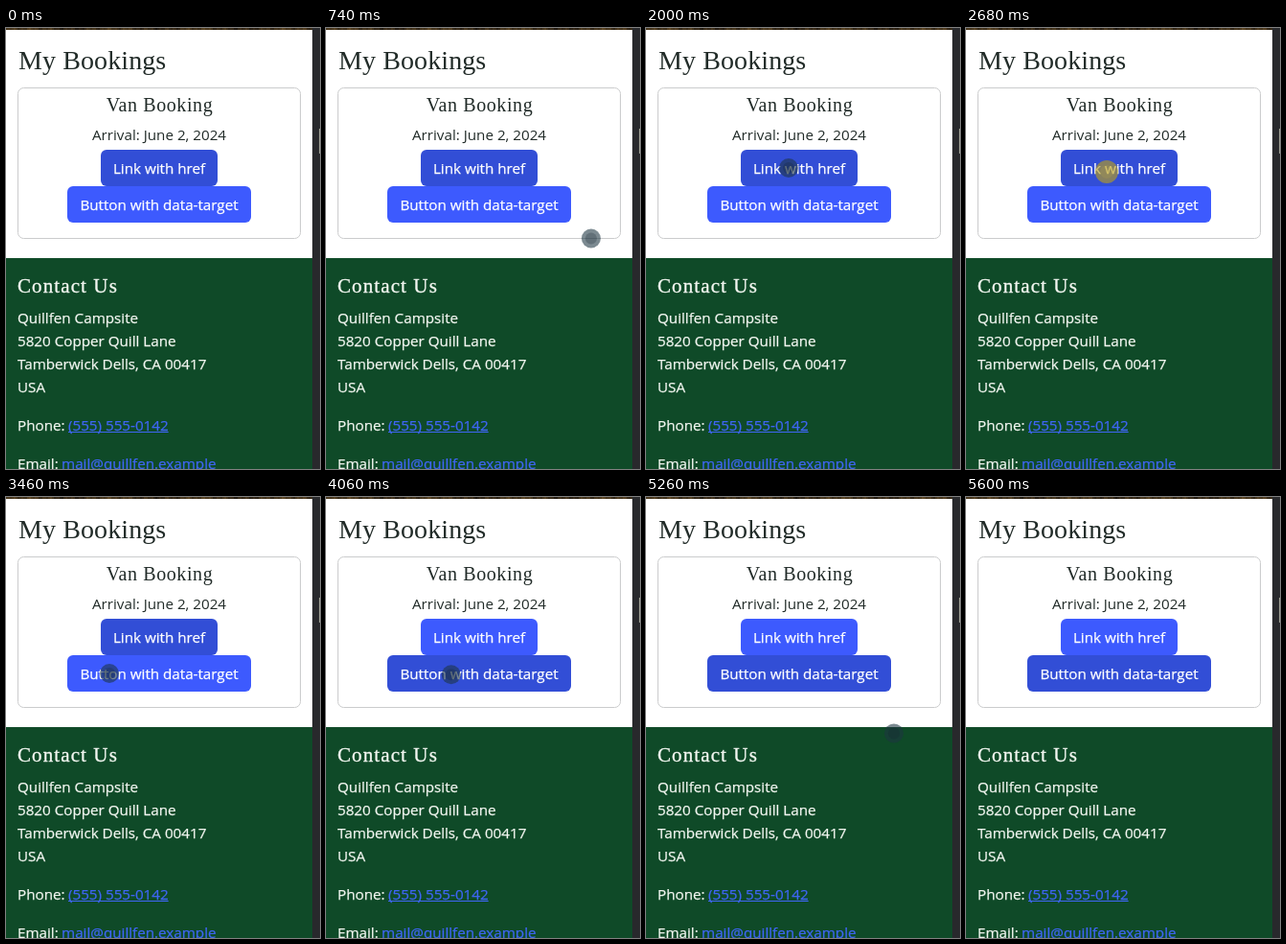
Animation, 328 px wide and 460 px high, one loop 6600 ms. Source, as an HTML page with a canvas:

```html
<!DOCTYPE html>
<html lang="en">
<head>
<meta charset="utf-8">
<title>My Bookings</title>
<style>
html, body { margin: 0; width: 100%; height: 100%; overflow: hidden; background: #fff; }
canvas { display: block; width: 328px; height: 460px; }
</style>
</head>
<body>
<canvas id="stage"></canvas>
<script>
const W = 328, H = 460, LOOP = 6600;
const SANS = '15.2px "Open Sans", "Noto Sans", sans-serif';
const SERIF = '"Liberation Serif", "Noto Serif", serif';
const BLUE = [61, 90, 254], HOVER = [50, 78, 214];
const INK = '#212b28', PALE = '#f3f7f1', LINK = '#3f66f5';

const canvas = document.getElementById('stage');
const ctx = canvas.getContext('2d');
const dpr = window.devicePixelRatio || 1;
canvas.width = W * dpr;
canvas.height = H * dpr;
ctx.scale(dpr, dpr);

// Pointer stops: time, x, y
const path = [
  [380, 340, 262], [1260, 168, 146], [1440, 168, 146], [2000, 149, 146],
  [2680, 147, 150], [2800, 147, 150], [3460, 108, 184], [3560, 107, 184],
  [3740, 107, 184], [4300, 146, 186], [4660, 146, 186], [4840, 144, 186],
  [5600, 342, 290]
];
const presses = [[1260, 1440], [2680, 2800], [3560, 3740], [4300, 4660]];
const SWITCH = 3740, FADE = 150;

const clamp = v => Math.max(0, Math.min(1, v));
const ease = v => v * v * (3 - 2 * v);
const mix = (a, b, k) => `rgb(${a.map((v, i) => Math.round(v + (b[i] - v) * k))})`;

function rect(x, y, w, h, color) {
  ctx.fillStyle = color;
  ctx.fillRect(x, y, w, h);
}

function disc(x, y, r, color) {
  ctx.fillStyle = color;
  ctx.beginPath();
  ctx.arc(x, y, r, 0, Math.PI * 2);
  ctx.fill();
}

// A thin outline adds a little weight to the strokes.
function text(str, x, y, color, { font = SANS, align = 'left', weight = 0.25, spacing = 0 } = {}) {
  ctx.font = font;
  ctx.textAlign = align;
  ctx.letterSpacing = spacing + 'px';
  ctx.fillStyle = ctx.strokeStyle = color;
  ctx.lineWidth = weight;
  ctx.fillText(str, x, y);
  if (weight) ctx.strokeText(str, x, y);
  return ctx.measureText(str).width;
}

function heading(str, x, y, size, color, style) {
  text(str, x, y, color, { font: `${size}px ${SERIF}`, weight: 0, ...style });
}

function button(label, x, y, w, hover) {
  ctx.fillStyle = mix(BLUE, HOVER, hover);
  ctx.beginPath();
  ctx.roundRect(x, y, w, 38, 6);
  ctx.fill();
  text(label, x + w / 2, y + 25, '#fff', { align: 'center' });
}

function link(label, x, y) {
  const w = text(label, x, y, LINK);
  rect(x, y + 1, w, 1, LINK);
}

// Sliver of a dark woodland photo
function drawPhoto() {
  for (let x = 0; x < 320; x += 2) {
    const k = (Math.sin(x * 0.31) + Math.sin(x * 0.83 + 1) + Math.sin(x * 0.07)) / 6 + 0.5;
    rect(x, 0, 2, 2, mix([26, 20, 13], [98, 74, 38], k));
  }
}

function drawPage(t) {
  rect(0, 0, W, H, '#fff');
  drawPhoto();

  heading('My Bookings', 13, 43, 28, INK, { spacing: 0.1 });
  ctx.strokeStyle = '#cbcccd';
  ctx.lineWidth = 1;
  ctx.beginPath();
  ctx.roundRect(12.5, 62.5, 295, 157, 6);
  ctx.stroke();
  heading('Van Booking', 160.5, 87, 20, INK, { align: 'center', spacing: 0.6 });
  text('Arrival: June 2, 2024', 160, 117, INK, { align: 'center', weight: 0 });

  const swap = ease(clamp((t - SWITCH) / FADE));
  button('Link with href', 99, 127, 122, 1 - swap);
  button('Button with data-target', 64, 165, 192, swap);

  rect(0, 240, 320, 220, '#0f4a28');
  heading('Contact Us', 12, 276, 21, PALE, { spacing: 1.1, weight: 0.35 });
  ['Quillfen Campsite', '5820 Copper Quill Lane', 'Tamberwick Dells, CA 00417', 'USA']
    .forEach((line, i) => text(line, 12, 308 + i * 24, PALE));
  text('Phone: ', 12, 420, PALE);
  link('(555) 555-0142', 65, 420);
  text('Email: ', 12, 460, PALE);
  link('mail@quillfen.example', 58, 460);

  rect(320, 0, 8, H, '#28292c');
  rect(327, 105, 1, 26, '#96978c');
}

function pointerAt(t) {
  const i = path.findIndex(p => p[0] > t);
  if (i < 1) return null;
  const [t0, x0, y0] = path[i - 1], [t1, x1, y1] = path[i];
  const k = ease((t - t0) / (t1 - t0));
  return [x0 + (x1 - x0) * k, y0 + (y1 - y0) * k];
}

function drawPointer(t) {
  const pos = pointerAt(t);
  if (!pos) return;
  const [x, y] = pos;
  ctx.save();
  ctx.beginPath();
  ctx.rect(0, 0, 320, H);
  ctx.clip();
  if (presses.some(([from, to]) => t >= from && t < to)) {
    disc(x, y, 12, 'rgba(186, 160, 24, 0.62)');
    disc(x, y, 7, 'rgba(205, 180, 60, 0.15)');
  } else {
    disc(x, y, 10, 'rgba(30, 54, 66, 0.58)');
    disc(x, y, 6, 'rgba(20, 36, 46, 0.25)');
  }
  ctx.restore();
}

const start = performance.now();
function frame() {
  const t = (performance.now() - start) % LOOP;
  drawPage(t);
  drawPointer(t);
  requestAnimationFrame(frame);
}
frame();
</script>
</body>
</html>
```
